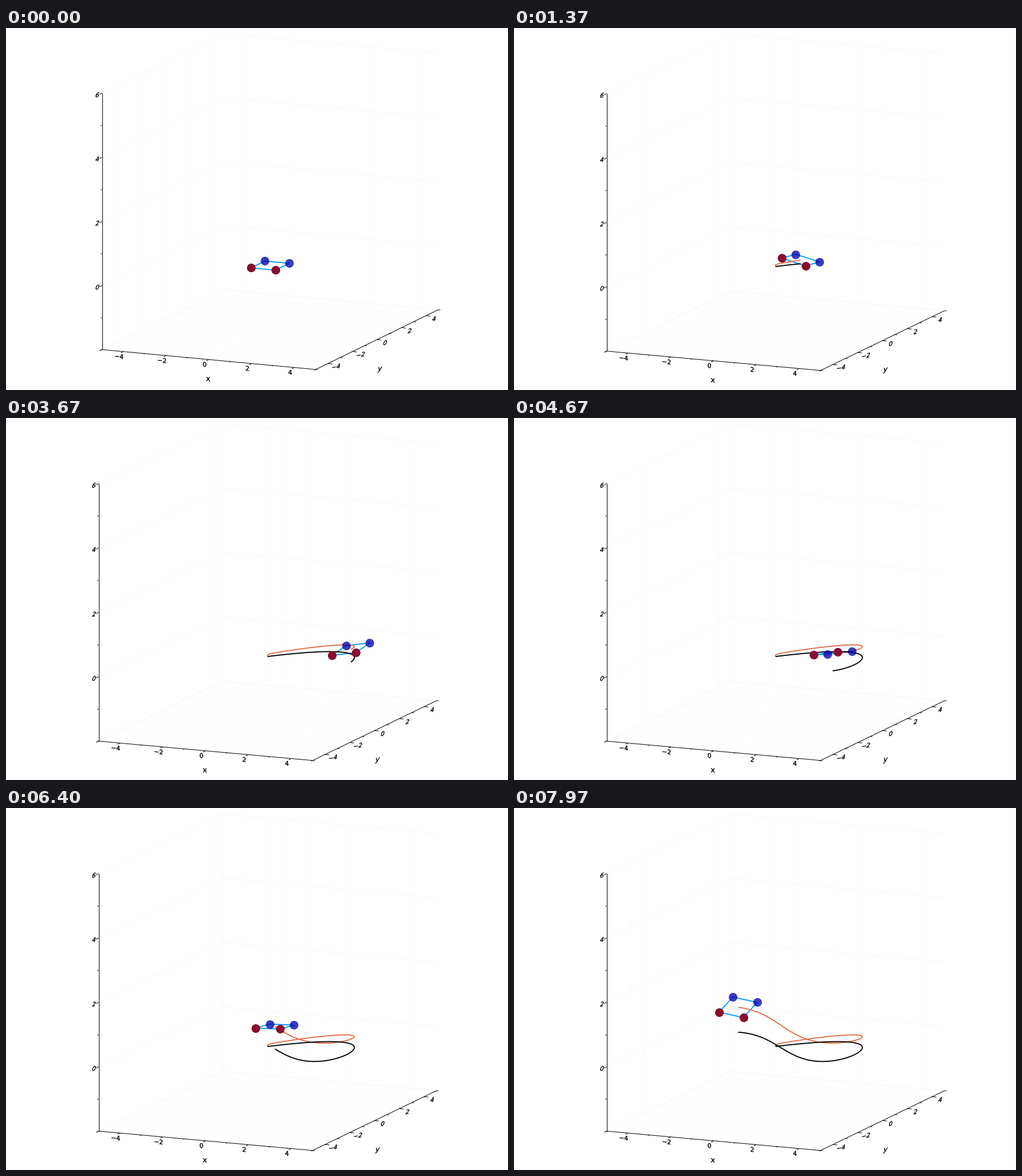
A matplotlib script for the animation above (8000 ms loop, 881 px wide and 636 px high).

```python
import numpy as np
import matplotlib.pyplot as plt
from matplotlib.animation import FuncAnimation
from matplotlib.collections import LineCollection, PathCollection
from matplotlib.path import Path
from matplotlib.textpath import TextPath

W, H, DPI = 881, 636, 100
PX = 72 / DPI
FRAMES, LOOP = 240, 8000
SUB = 20            # simulation steps per frame
ARM = 0.566
LO, HI = np.array([-5, -5, -2]), np.array([5, 5, 6])

# Parallel projection: screen origin, then the x, y and z unit vectors
VIEWS = [
    ((463.5, 417.4), np.array([(37.5, 3.5), (21.5, -10.5), (0, -56.3)])),
    ((459.0, 419.1), np.array([(37.55, 3.4), (21.75, -10.5), (0, -56.55)])),
]


def project(points, view):
    origin, axes = view
    return np.asarray(points, float) @ axes + origin


def chase(goal, lag, dt):
    """Follow a moving goal from rest through four equal lags."""
    state, out = np.zeros(4), []
    for g in goal:
        out.append(state[3])
        state = state + (np.append(g, state[:3]) - state) * dt / lag
    return np.array(out)


def tilt(pos, t):
    """Sine of the lean needed for the acceleration, slightly delayed."""
    accel = np.gradient(np.gradient(pos, t), t)
    return -.115 * np.interp(t - .15, t, accel)


# The vehicle takes off and chases a climbing figure of eight
dt = LOOP / FRAMES / SUB / 1000
t = np.arange(FRAMES * SUB) * dt
OMEGA = .578
x = chase(4 * np.sin(OMEGA * t), .3, dt)
y = chase(1.9 * np.sin(2 * OMEGA * t), .285, dt)
z = (.1 * t + .03 + .06 * np.cos(.95 * (t - 5.2))) * (1 - np.exp(-t / .2))
path = np.column_stack([x, y, z])[::SUB]
pitch, roll = np.arcsin(tilt(x, t))[::SUB], np.arcsin(tilt(y, t))[::SUB]


def corners(i):
    """Four rotors in order around the frame, front pair first."""
    p, r = pitch[i], roll[i]
    u = np.array([np.cos(p), -np.sin(p) * np.sin(r), np.sin(p) * np.cos(r)])
    v = np.array([0, np.cos(r), np.sin(r)])
    signs = [(-1, -1), (1, -1), (1, 1), (-1, 1)]
    return np.array([path[i] + ARM * (a * u + b * v) for a, b in signs])


fig = plt.figure(figsize=(W / DPI, H / DPI), dpi=DPI, facecolor="white")
ax = fig.add_axes([0, 0, 1, 1])
ax.set(xlim=(0, W), ylim=(H, 0))
ax.axis("off")


def add_lines(segments, view, color):
    lines = [project(s, view) for s in segments]
    return ax.add_collection(
        LineCollection(lines, colors=color, linewidths=PX, zorder=1),
        autolim=False)


def glyphs(text, center, size, skew):
    """Outline of a text, slanted by a 2x2 matrix and centred on a point."""
    tp = TextPath((0, 0), text, size=size, prop={"family": "DejaVu Sans"})
    box = tp.get_extents()
    mid = [(box.x0 + box.x1) / 2, (box.y0 + box.y1) / 2]
    verts = (tp.vertices - mid) @ np.array(skew).T * (1, -1) + center
    return Path(verts, tp.codes)


def at(axis, value, base):
    point = np.array(base, float)
    point[axis] = value
    return point


def grid(view):
    level = [[(-5, -5, k), (-5, 5, k), (5, 5, k)] for k in range(-2, 7, 2)]
    upright = []
    for k in range(-5, 6):
        upright.append([(k, 5, 6), (k, 5, -2), (k, -5, -2)])
        upright.append([(-5, k, 6), (-5, k, -2), (5, k, -2)])
    return [add_lines(upright, view, "#fcfcfc"),
            add_lines(level, view, "#f8f8f8")]


# Per axis: start corner, tick direction, label offset, letter slant
STRAIGHT = [(1, 0), (-.09, 1)]
SLANTED = [(.95, .25), (.18, 1)]
AXES = [
    ((-5, -5, -2), (0, -1, 0), (-7.4, 8.4), STRAIGHT),
    ((5, -5, -2), (1, 0, 0), (14.4, 5.3), SLANTED),
    ((-5, -5, -2), (0, -1, 0), (-8, 2.9), SLANTED),
]


def axes_frame(view):
    lines, words = [], []
    for axis, (base, out, shift, skew) in enumerate(AXES):
        lines.append([at(axis, LO[axis], base), at(axis, HI[axis], base)])
        for k in range(LO[axis], HI[axis] + 1):
            p = at(axis, k, base)
            length = .1 if k % 2 else .2
            lines.append([p, p + np.array(out) * length])
            if k % 2 == 0 and k > LO[axis]:
                label = str(k).replace("-", "\u2212")
                words.append(glyphs(label, project(p, view) + shift, 11, skew))
    for text, p, shift, skew in [("x", (0, -5, -2), (-1.3, 34.4), STRAIGHT),
                                 ("y", (5, 0, -2), (4.8, 52.6), SLANTED)]:
        words.append(glyphs(text, project(p, view) + shift, 12.5, skew))
    text = PathCollection(words, facecolors="black", edgecolors="black",
                          linewidths=.4 * PX, zorder=2)
    return [add_lines(lines, view, "black"),
            ax.add_collection(text, autolim=False)]


scenes = [grid(v) + axes_frame(v) for v in VIEWS]


def curve(color, z):
    return ax.plot([], [], color=color, lw=1.9 * PX, zorder=z,
                   solid_joinstyle="round", solid_capstyle="butt")[0]


def balls(color, alpha=1):
    return ax.plot([], [], "o", color=color, alpha=alpha, ms=15.2 * PX,
                   mew=0, zorder=6)[0]


body = curve("#009af9", 3)
trail = curve("#e26f46", 4)
shadow = curve("black", 5)
rear = balls("#0000aa", .77)
front = balls("#8a0c2e")


def draw(i):
    layout = 0 if i == 0 else 1
    view = VIEWS[layout]
    for n, scene in enumerate(scenes):
        for artist in scene:
            artist.set_visible(n == layout)
    c = project(corners(i), view)
    body.set_data(*c[[0, 1, 2, 3, 0]].T)
    front.set_data(*c[:2].T)
    rear.set_data(*c[2:].T)
    flown = path[:i + 1] if i else path[:0]
    trail.set_data(*project(flown, view).T)
    shadow.set_data(*project(flown * (1, 1, 0), view).T)
    return body, trail, shadow, rear, front


anim = FuncAnimation(fig, draw, frames=FRAMES, interval=LOOP / FRAMES,
                     repeat=True, blit=False)
plt.show()
```
